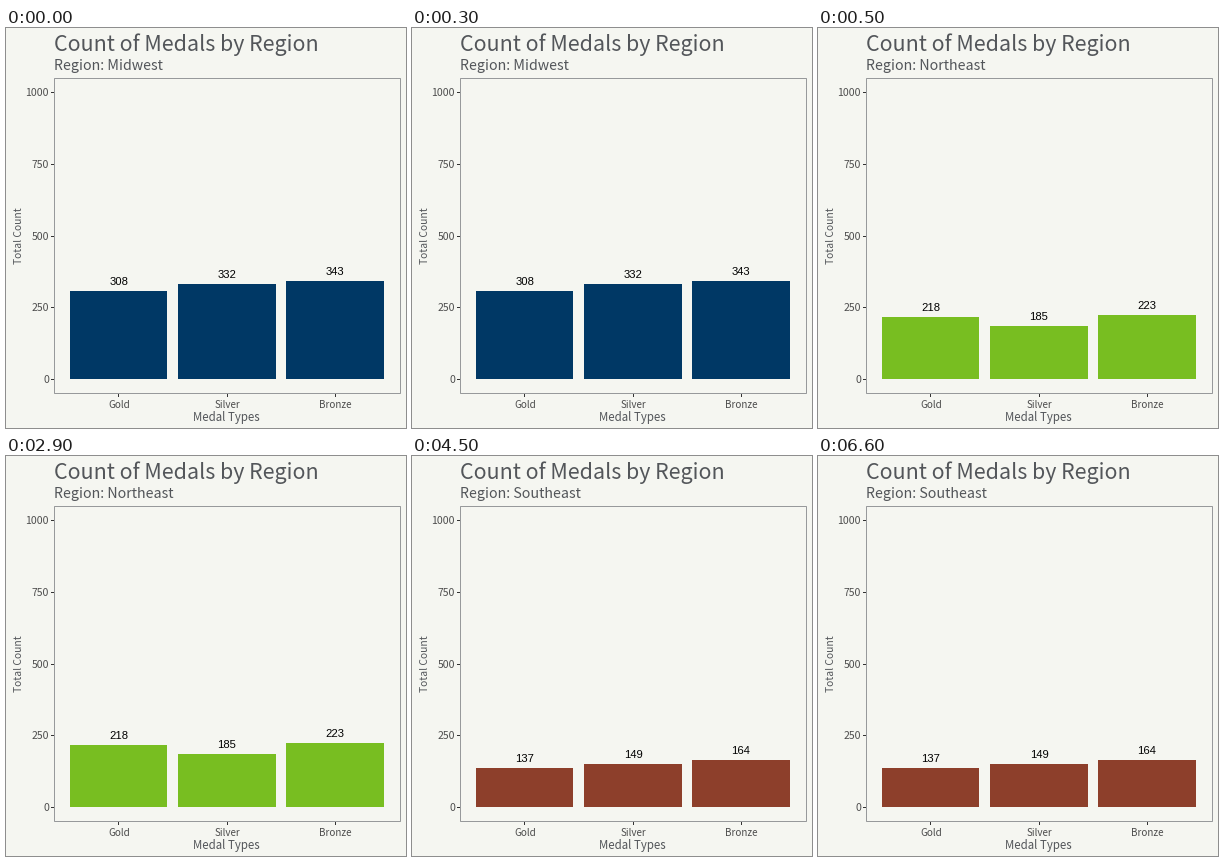
A matplotlib script for the animation above (8 s loop, 400 by 400 pixels).

```python
import matplotlib.pyplot as plt
from matplotlib.animation import FuncAnimation
from matplotlib.patches import Rectangle

SIZE, DPI = 400, 100
STEP_MS, FRAMES = 500, 16
BG = "#f5f6f1"
GREY = "#53565a"
TICK_TEXT = "#4d4d4d"
SANS = "Noto Sans CJK JP"
ONE_PX = 72 / DPI

MEDALS = ["Gold", "Silver", "Bronze"]
CENTERS = [112.8, 221, 329]
HALF_BAR = 48.6
ZERO_Y, PX_PER_UNIT = 351, 0.2864

# start time in ms, region, bar colour, counts
STATES = [
    (0, "Midwest", "#003865", [308, 332, 343]),
    (500, "Northeast", "#78be21", [218, 185, 223]),
    (4500, "Southeast", "#8d3f2b", [137, 149, 164]),
]

fig = plt.figure(figsize=(SIZE / DPI, SIZE / DPI), dpi=DPI, facecolor=BG)
ax = fig.add_axes([0, 0, 1, 1])
ax.set_xlim(0, SIZE)
ax.set_ylim(SIZE, 0)
ax.axis("off")


def label(x, y, text, px, color=GREY, ha="center", font=SANS, **kw):
    return ax.text(x, y, text, fontsize=px * ONE_PX, color=color, ha=ha,
                   va="baseline", family=font, **kw)


def tick(xs, ys):
    # half-pixel coordinates are already crisp, so snapping stays off
    ax.plot(xs, ys, color="#333333", lw=ONE_PX, solid_capstyle="butt",
            snap=False)


def y_of(count):
    return ZERO_Y - count * PX_PER_UNIT


label(48, 23, "Count of Medals by Region", 21.4, ha="left")
subtitle = label(48, 42, "", 14.25, ha="left")
label(220.7, 393, "Medal Types", 11.5)
label(16, 207.5, "Total Count", 10.3, rotation=90, rotation_mode="anchor")

for count in range(0, 1001, 250):
    y = int(y_of(count) + 0.3)
    tick([45, 48], [y + 0.5, y + 0.5])
    label(43, y + 4, str(count), 10.5, TICK_TEXT, ha="right")

bars, values = [], []
for x, medal in zip(CENTERS, MEDALS):
    mid = int(x) + 0.5
    tick([mid, mid], [366, 369])
    label(x, 380, medal, 9.9, TICK_TEXT)
    left, right = round(x - HALF_BAR), round(x + HALF_BAR)
    bar = Rectangle((left, ZERO_Y), right - left, 0, lw=0)
    bars.append(ax.add_patch(bar))
    values.append(label(x, 0, "", 11.2, "black", font="Liberation Sans"))

ax.add_patch(Rectangle((48.5, 50.5), 346, 315, fill=False, snap=False,
                       edgecolor="#97999b", lw=ONE_PX))


def draw(i):
    state = [s for s in STATES if s[0] <= i * STEP_MS][-1]
    _, region, color, counts = state
    subtitle.set_text("Region: " + region)
    for x, bar, value, count in zip(CENTERS, bars, values, counts):
        top = round(y_of(count))
        bar.set_y(top)
        bar.set_height(ZERO_Y - top)
        bar.set_facecolor(color)
        value.set_text(str(count))
        value.set_position((x, top - 6))
    return [subtitle, *bars, *values]


anim = FuncAnimation(fig, draw, frames=FRAMES, interval=STEP_MS,
                     repeat=True, repeat_delay=0, blit=False)
plt.show()
```
